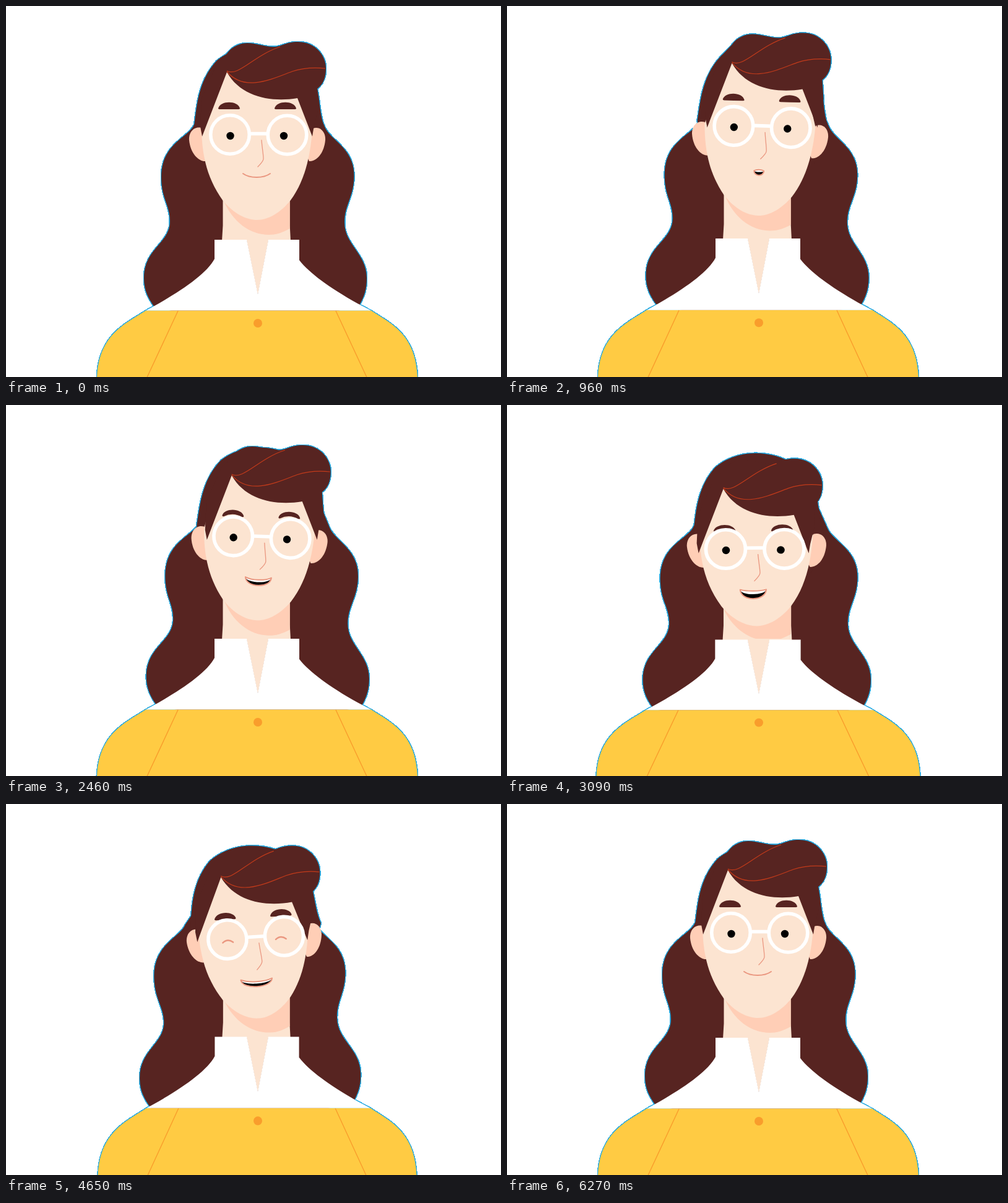
An HTML page that plays this animation: 800 px wide and 600 px high, repeating every 6300 ms.

```html
<!DOCTYPE html>
<html lang="en">
<head>
<meta charset="utf-8">
<title>Talking portrait</title>
<style>
  html, body { margin: 0; width: 100%; height: 100%; overflow: hidden; background: #fff; }
  svg { display: block; width: 100vw; height: 100vh; }
  .hair { fill: #572421; }
  .skin { fill: #fce4d1; }
  .blush { fill: #ffceb6; }
  .halo { stroke: #29abe2; stroke-width: 3; shape-rendering: crispEdges; }
  .strand { fill: none; stroke: #c23a1a; stroke-width: 1.2; }
  .seam { fill: none; stroke: #f99d2c; stroke-width: 1.4; }
  .specs { fill: none; stroke: #fff; stroke-width: 5.6; }
  .line { fill: none; stroke: #ea9780; stroke-linecap: round; }
</style>
</head>
<body>
<svg viewBox="0 0 800 600">
  <defs>
    <clipPath id="neckClip"><path d="M350.5 280H458.7V378H350.5Z"/></clipPath>
  </defs>

  <g class="halo">
    <use href="#back"/><use href="#dome"/><use href="#front"/><use href="#suit"/>
  </g>

  <path id="back" class="hair" data-part="back" d="M320 170L304 192C296 212 251 222 251 276C251 312 265 322 265 348C265 384 223 392 223 440C223 460 230 473 240 487L300 500H510L571 484C579 470 583 458 583 440C583 400 547 386 547 350C547 322 562.5 308 562.5 275C562.5 228 524 218 515 195L500 160Z"/>
  <path id="dome" class="hair" data-part="dome" d="M304 195C307 170 309 150 316 130C322 113 330 100 340 89C355 76 378 66.5 405 66.5C450 67 490 90 503 134C508 158 507 175 515 198L495 260H316Z"/>

  <path class="skin" data-part="body" d="M350.5 280H458.7V355L460 380H424L407 468L389 380H349L350.5 355Z"/>
  <g clip-path="url(#neckClip)">
    <path class="blush" data-part="head" d="M340 290L351 313C366 350 395 370 425 370C440 370 452 365 475 350V290Z"/>
  </g>

  <g data-part="head">
    <path class="blush" d="M316 197C303 194 295 205 296 217C298 238 311 252 323 251L335 225Z"/>
    <path class="blush" d="M496 198C508 194 517 204 516 217C514 238 502 252 490 251L478 225Z"/>
    <path class="skin" d="M365 85L328 150L316 200C317 245 326 280 350 314C368 336 388 346 406 346C424 346 444 334 460 314C482 284 492 245 495 200L482 150L450 85Z"/>
  </g>

  <path id="front" class="hair" data-part="front" d="M317 211L357 107C380 148 430 156 471 149L495 211L497.5 196L505 165L503 134C512 127 517 117 517 101C517 80 500 58 472 58C452 58 445 66 432 66C418 66 405 60 390 60C380 60 366 64 357 77L340 95L316 150L314 195Z"/>
  <g class="strand" data-part="front">
    <path d="M357 105C375 115 400 80 443 66"/>
    <path d="M357 106C385 140 430 118 462 106C480 100 498 99 516 101"/>
  </g>

  <g data-part="face">
    <path class="hair brow" data-x="360.5"/>
    <path class="hair brow" data-x="451.5"/>
    <g class="specs">
      <circle cx="362" cy="208" r="31.3"/>
      <circle cx="454.5" cy="208.5" r="31.3"/>
      <path d="M394 206.5H422"/>
    </g>
    <g id="open">
      <ellipse class="eye" cx="362.5" cy="210" rx="6.2"/>
      <ellipse class="eye" cx="449" cy="210" rx="6.2"/>
    </g>
    <g id="shut" class="line" stroke-width="2.4">
      <path d="M354 213Q362.5 206 371 213"/>
      <path d="M440.5 213Q449 206 457.5 213"/>
    </g>
    <path class="line" stroke-width="1.3" d="M413 217C414 230 416 240 416 247Q416 251 407 260"/>
    <path id="mouth"/>
    <path id="teeth" fill="#fff"/>
    <path id="lips" class="line" stroke-width="2" stroke-linejoin="round"/>
  </g>

  <g id="suit" data-part="body">
    <path fill="#ffcb43" d="M147 620V600C150 530 195 513 226 492.5H590C621 513 662 530 665 600V620Z"/>
    <path fill="#fff" d="M337 378V409C325 432 285 460 238 486L226 492.6H590L568 481C525 457 490 432 474 411V378H424L407 466L389 378Z"/>
  </g>
  <g data-part="body">
    <path class="seam" d="M278 493L224 609M533 493L587 609"/>
    <circle cx="407" cy="513" r="7" fill="#f99d2c"/>
  </g>
</svg>

<script>
const LOOP = 6300;

// turn: head tilt in degrees; lift, nod: drop of the head and of the features over it;
// pan, sway: sideways shift of features and long hair; rise, wide: body stretch in percent.
const rest = {
  turn: 0, lift: 0, nod: 0, pan: 0, sway: 0, fringe: 0, puff: 0, rise: 0, wide: 0,
  brow: 0, bend: 5.5, drop: 0, lip: 22, upper: 6, lower: 6
};
const pose = (from, to, changes) => ({ from, to, ...rest, ...changes });

// Each pose is reached at "from" and held until "to".
const poses = [
  pose(0, 30),
  pose(700, 1000, { turn: 1.5, lift: -7, nod: -5.7, pan: 1, sway: 2.5, rise: .9, drop: 8.5, lip: 8, upper: -2, lower: 7 }),
  pose(1650, 2400, { turn: 1.8, lift: 2.2, nod: 3.5, pan: 1.3, sway: 5, brow: 9.5, bend: -2.5, drop: 2, lip: 21, upper: 4, lower: 13 }),
  pose(3350, 3380, { turn: -.8, lift: 13.3, nod: 15.3, pan: -8.4, sway: -.3, puff: 2.8, rise: -.84, wide: 1.15, brow: 14, bend: -2.5, drop: 3, lip: 20.5, upper: 2, lower: 15 }),
  pose(3880, 4000, { turn: -2.6, lift: -6.5, nod: -5.5, pan: 7, sway: 1, fringe: -4, puff: -.8, rise: 1.1, wide: -1, drop: 1 }),
  pose(4600, 4750, { turn: -3.2, lift: .8, nod: 7.3, pan: 2.6, sway: -10.3, fringe: -1, puff: -.8, rise: .7, wide: -.6, brow: 9, drop: 4, lip: 25.5, upper: 4, lower: 12 }),
  pose(5850, LOOP)
];

const $ = id => document.getElementById(id);
const all = q => [...document.querySelectorAll(q)];
const parts = all('[data-part]'), brows = all('.brow'), eyes = all('.eye');
const mix = (a, b, k) => a + (b - a) * k;
const clamp = (v, low = 0) => Math.min(1, Math.max(low, v));
const ease = k => (1 - Math.cos(Math.PI * clamp(k))) / 2;

function poseAt(t) {
  const i = Math.max(1, poses.findIndex(p => t <= p.to));
  const a = poses[i - 1], b = poses[i];
  const k = ease((t - a.to) / (b.from - a.to));
  const now = {};
  for (const key in rest) now[key] = mix(a[key], b[key], k);
  return now;
}

// Eye opening: one quick blink, then a long laugh with closed eyes.
function lidAt(t) {
  const blink = clamp(Math.abs(t - 1840) / 70, .1);
  const laugh = clamp(Math.max((4400 - t) / 200, (t - 5150) / 150));
  return Math.min(blink, laugh);
}

const place = (px, py, dx, dy, turn, sx = 1, sy = 1) =>
  `translate(${px + dx} ${py + dy}) rotate(${turn}) scale(${sx} ${sy}) translate(${-px} ${-py})`;

// Parts higher above the neck swing further; nearer parts shift more.
function layout(p) {
  const swing = (y, turn = p.turn) => (320 - y) * Math.sin(turn * Math.PI / 180);
  const puff = 1 + p.puff / 100, look = p.turn * 1.15;
  const headX = swing(224) + p.pan * .3;
  return {
    back: place(407, 370, p.sway, p.lift * .35, p.turn / 2, puff),
    dome: place(406, 224, headX, p.lift, p.turn),
    head: place(406, 224, headX, p.lift, p.turn, puff),
    face: place(408, 208, swing(208, look) + p.pan, p.lift + p.nod, look, puff),
    front: place(430, 105, swing(105) + p.pan * .9, p.lift + p.nod * 1.3, p.fringe),
    body: place(407, 600, 0, 0, 0, 1 + p.wide / 100, 1 + p.rise / 100)
  };
}

function drawBrows({ brow, bend }) {
  const y = 161.5 + brow, low = y + 5.5;
  for (const el of brows) {
    const x = +el.dataset.x, l = x - 17.5, r = x + 17.5;
    el.setAttribute('d', `M${l} ${y + 4}C${x - 14} ${y - 9} ${x + 14} ${y - 9} ${r} ${y + 4}` +
      `Q${r} ${low} ${r - 2.5} ${low}Q${x} ${y + bend} ${l + 2.5} ${low}Q${l} ${low} ${l} ${y + 4}Z`);
  }
}

function drawEyes(lid) {
  const shut = lid < .08;
  for (const el of eyes) el.setAttribute('ry', 6.2 * lid);
  $('open').style.display = shut ? 'none' : '';
  $('shut').style.display = shut ? '' : 'none';
}

function drawMouth({ drop, lip, upper, lower }) {
  const x = 405, y = 271 + drop, gap = lower - upper;
  const full = mix(.5, .95, clamp(gap / 8));
  const curve = (side, mid, k) => {
    const cx = side * lip * k, cy = y + mid * 4 / 3;
    return `C${x - cx} ${cy} ${x + cx} ${cy} ${x + side * lip} ${y}`;
  };
  const top = `M${x - lip} ${y}` + curve(1, upper, .5);
  const shape = top + curve(-1, lower, full) + 'Z';
  $('mouth').setAttribute('d', shape);
  $('lips').setAttribute('d', shape);
  $('teeth').setAttribute('d', top + curve(-1, upper + gap * .42, full) + 'Z');
}

function draw(t) {
  const now = poseAt(t), places = layout(now);
  for (const el of parts) el.setAttribute('transform', places[el.dataset.part]);
  drawBrows(now);
  drawEyes(lidAt(t));
  drawMouth(now);
}

function tick() {
  draw(performance.now() % LOOP);
  requestAnimationFrame(tick);
}
tick();
</script>
</body>
</html>
```
